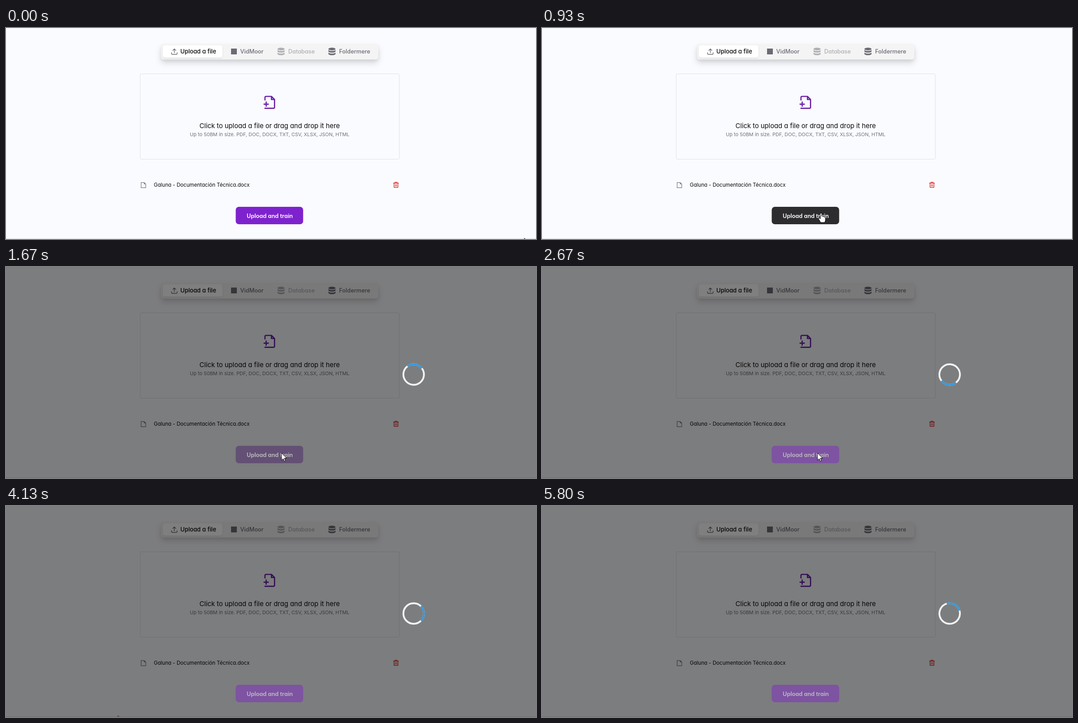
An HTML page that plays this animation: 1187x472 px, repeating every 5870 ms.

```html
<!DOCTYPE html>
<html lang="en">
<head>
<meta charset="utf-8">
<title>Upload and train</title>
<style>
  html, body { margin: 0; width: 100%; height: 100%; overflow: hidden; background: #fafbfe; }
  svg { display: block; font-family: Inter, "Open Sans", sans-serif; font-feature-settings: "cv11"; }
  .bar { fill: #f4f4f5; filter: drop-shadow(0 8px 7px #0002) drop-shadow(0 2px 3px #0001); }
  .active { fill: #fff; filter: drop-shadow(0 1px 1px #0002); }
  .tab { font-size: 12.8px; font-weight: 500; fill: #6b6b74; }
  .tab .on { font-size: 13.2px; fill: #09090b; }
  .line { fill: none; stroke-linecap: round; stroke-linejoin: round; }
  .mid { text-anchor: middle; }
</style>
</head>
<body>
<svg width="1187" height="472" viewBox="0 0 1187 472">
  <defs>
    <g id="db">
      <ellipse cx="8" cy="3" rx="8" ry="3"/>
      <path id="band" d="M0 5.2Q2.5 7.6 8 7.6T16 5.2V8.2Q15 11 8 11T0 8.2Z"/>
      <use href="#band" y="5.7"/>
    </g>
  </defs>

  <rect width="1187" height="472" fill="#fafbfe"/>
  <path d="M0 .5H1187" stroke="#f5f6f8"/>
  <path d="M0 471.5H1187" stroke="#d9dade"/>

  <rect class="bar" x="347" y="36" width="487" height="34.5" rx="6"/>
  <rect class="active" x="351" y="38.5" width="134" height="28" rx="5"/>
  <path class="line" stroke="#6b6b74" stroke-width="1.4" d="M370.700 55V57Q370.700 59 372.700 59H381.300Q383.300 59 383.300 57V55M377 55.500V46.800M373.500 50.200L377 46.700 380.500 50.200"/>
  <g class="tab">
    <text class="on" x="390.5" y="57.3">Upload a file</text>
    <rect x="504" y="46" width="13" height="13"/>
    <text x="524.5" y="57.3">VidMoor</text>
    <g opacity=".5">
      <use href="#db" x="608" y="44"/>
      <text x="632" y="57.3">Database</text>
    </g>
    <use href="#db" x="722" y="44"/>
    <text x="746" y="57.3">Foldermere</text>
  </g>

  <rect x="300.5" y="102.5" width="580.5" height="191" rx="3.5" fill="none" stroke="#dfe0e5"/>
  <path class="line" stroke="#6b21a8" stroke-width="2.7" d="M580 161V155.500Q580 153 582.500 153H594.500L601.400 160V177Q601.400 179.700 599 179.700H580M594.500 153V160H601.400M578 170.300H587.500M582.700 165.500V175"/>
  <text class="mid" x="590.5" y="223.5" font-size="14.8" fill="#09090b">Click to upload a file or drag and drop it here</text>
  <text class="mid" x="590.5" y="241.5" font-size="11" fill="#71717a">Up to 50BM in size. PDF, DOC, DOCX, TXT, CSV, XLSX, JSON, HTML</text>

  <path class="line" stroke="#77777f" stroke-width="1.2" d="M302.600 345.600H309.500L313 349V357.400H302.600ZM309.500 345.600V349H313"/>
  <text x="331" y="355.3" font-size="11.6" fill="#09090b">Galuna - Documentación Técnica.docx</text>
  <path class="line" stroke="#dc2626" stroke-width="1.3" d="M867.800 347H879M871 347V344.800H875.800V347M869 347V356.500H877.800V347M872 350V353.800M874.800 350V353.800"/>

  <rect id="shade" width="1187" height="472" opacity=".5"/>
  <rect id="button" x="514.5" y="400" width="151" height="39" rx="7"/>
  <text id="label" class="mid" x="590.7" y="424.5" font-size="12.8" font-weight="600">Upload and train</text>

  <g id="spinner" fill="none" stroke-width="4">
    <circle r="23" stroke="#f3f3f3"/>
    <path d="M-16.260-16.260A23 23 0 0 1 16.260-16.260" stroke="#3498db"/>
  </g>
  <g id="cursor" fill="#fff" stroke="#000" stroke-linejoin="round">
    <path id="arrow" d="M0 0V16.500L3.900 12.800 6.500 18.700 9 17.600 6.400 11.800H11.600Z"/>
    <path id="hand" d="M-1.700 1.600A1.700 1.700 0 0 1 1.700 1.600V7Q5 6 5.300 8 7.600 7.300 8 9 10 8.800 10 11V15Q10 18 8 21H-1Q-2 18-5.200 13.500-6 11.500-4.500 11-3 11-1.700 13Z"/>
  </g>
</svg>
<script>
const LOOP = 5870, STEP = 200 / 3;
const HOVER = 730, ARROW = 1600, LOAD = 1660, GONE = 4190;
const purple = [126, 34, 206], dark = [45, 45, 47];
const fading = [99, 80, 116], faded = [125, 83, 162];

// time, x, y of the pointer's tip
const path = [
  [0, 1161, 470], [200, 1040, 446], [400, 860, 420], [600, 717, 410],
  [670, 686, 411], [800, 645, 413], [930, 625, 414], [1130, 618, 416],
  [1440, 618, 416], [1460, 617, 416], [2800, 617, 416], [3000, 618, 415],
  [3400, 618, 415], [3600, 615, 416], [3800, 615, 416], [3930, 520, 428],
  [4133, 251, 469], [6000, 251, 469]
];

const el = id => document.getElementById(id);
const show = (id, on) => el(id).style.display = on ? "" : "none";
const clamp = p => Math.min(1, Math.max(0, p));
const mix = (a, b, p) => a.map((v, i) => v + (b[i] - v) * p);
const place = (id, x, y, turn = 0) =>
  el(id).setAttribute("transform", `translate(${x} ${y}) rotate(${turn})`);

function draw(t) {
  const loading = t >= LOAD;
  const hand = t >= HOVER && t < ARROW;

  const i = path.findIndex(k => k[0] > t);
  const [a, b] = [path[i - 1], path[i]];
  const [, x, y] = mix(a, b, (t - a[0]) / (b[0] - a[0]));
  place("cursor", x, y);
  show("cursor", t < GONE);
  show("hand", hand);
  show("arrow", !hand);

  const fill = loading ? mix(fading, faded, clamp((t - 1667) / 133))
                       : mix(purple, dark, clamp((t - HOVER) / 150));
  el("button").setAttribute("fill", `rgb(${fill.map(Math.round)})`);
  el("label").setAttribute("fill", loading ? "#bebebe" : "#fff");

  show("shade", loading);
  show("spinner", loading);
  place("spinner", 913, 240.5, 8 + (t - 1667) * 0.1792);
}

function tick() {
  const t = performance.now() % LOOP;
  draw(Math.floor((t + 3.4) / STEP) * STEP);
  requestAnimationFrame(tick);
}
tick();
</script>
</body>
</html>
```
